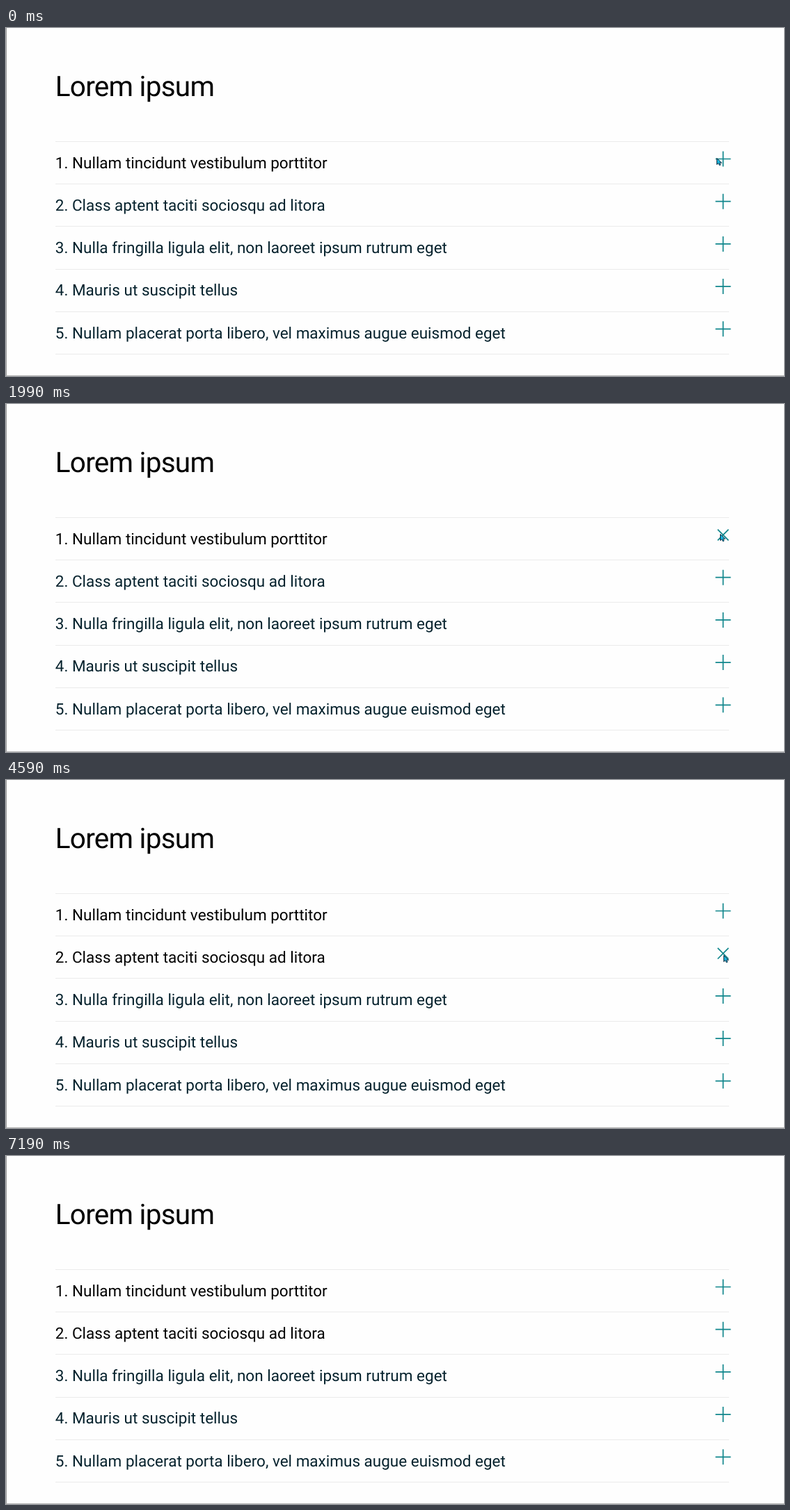
Write an HTML page with a canvas that moves like this. It is 1118 px wide and 501 px high and loops after 7.89 s.

```html
<!DOCTYPE html>
<html lang="la">
<head>
<meta charset="utf-8">
<title>Accordion</title>
<style>
  html, body { margin: 0; width: 100%; height: 100%; overflow: hidden; background: #fefefe; }
  canvas { display: block; }
</style>
</head>
<body>
<canvas id="stage" width="1118" height="501"></canvas>
<script>
const ctx = document.getElementById('stage').getContext('2d', { alpha: false });
const LOOP = 7890, LEFT = 70.8, PITCH = 61.2, PANEL = 54.5;
const TEAL = '#10808a', INK = '#06222d', BLACK = '#000';

const titles = [
  '1. Nullam tincidunt vestibulum porttitor',
  '2. Class aptent taciti sociosqu ad litora',
  '3. Nulla fringilla ligula elit, non laoreet ipsum rutrum eget',
  '4. Mauris ut suscipit tellus',
  '5. Nullam placerat porta libero, vel maximus augue euismod eget'
];
const panel = [
  'Cras vel nibh ac nisi dignissim molestie et sit amet dui. Quisque pulvinar vulputate mollis. ' +
  'Curabitur tempor risus turpis, ut condimentum arcu volutpat vitae. Curabitur in dolor',
  'eu justo viverra suscipit.'
];

const pointer = [
  [0, 1021, 187], [150, 1025, 187], [300, 1026, 187], [2580, 1033, 225], [2750, 1032, 238],
  [2880, 1031, 247], [3020, 1031, 252], [6730, 1040, 301], [6900, 1074, 440], [7050, 1092, 496],
  [7190, 1092, 520]
];
const clicks = [
  { row: 0, open: 800, opened: 950, close: 1990, turn: 2160, closed: 2310 },
  { row: 1, open: 3430, opened: 3560, close: 4590, turn: 4770, closed: 4930 }
];

const stepAt = (steps, t) => steps.filter(s => s[0] <= t).pop();

function text(str, y, size, color, spacing = 0) {
  ctx.font = `${size}px Roboto, sans-serif`;
  ctx.letterSpacing = spacing + 'px';
  ctx.textRendering = 'geometricPrecision';
  ctx.fillStyle = color;
  ctx.fillText(str, LEFT, y);
}

function rule(y) {
  ctx.fillStyle = '#ebebeb';
  ctx.fillRect(71, Math.round(y), 968, 1);
}

function plus(y, degrees) {
  ctx.save();
  ctx.translate(1030.5, y);
  ctx.rotate(degrees * Math.PI / 180);
  ctx.strokeStyle = '#10868c';
  ctx.lineWidth = 1.7;
  ctx.stroke(new Path2D('M-11 0H11M0-11V11'));
  ctx.restore();
}

const arrow = new Path2D('M.5 .5V9.6L2.7 7.7L4.3 10.8L5.9 10L4.5 7.1H7.5Z');
function drawPointer(x, y) {
  ctx.save();
  ctx.translate(x, y);
  ctx.fillStyle = '#19b4dc';
  ctx.strokeStyle = '#0b2c40';
  ctx.lineWidth = 1;
  ctx.fill(arrow);
  ctx.stroke(arrow);
  ctx.restore();
}

function angleOf(c, t) {
  if (!c || t < c.open || t >= c.closed) return 0;
  return t < c.opened || t >= c.turn ? 15 : 45;
}

function colorOf(c, row, t) {
  if (c && t >= c.open && t < c.close) return t < c.opened ? '#085058' : TEAL;
  return row === 0 || (c && t >= c.close) ? BLACK : INK;
}

function draw(t) {
  ctx.fillStyle = '#fefefe';
  ctx.fillRect(0, 0, 1118, 501);
  text('Lorem ipsum', 97.5, 40.5, BLACK, -0.75);
  rule(163);

  let shift = 0;
  titles.forEach((title, row) => {
    const y = row * PITCH + shift;
    const click = clicks.find(c => c.row === row);
    text(title, 201.8 + y, 22.5, colorOf(click, row, t));
    plus(188.5 + y, angleOf(click, t));
    if (click && t >= click.open && t < click.close) {
      panel.forEach((line, i) => text(line, 238 + y + i * 18.7, 12.49, '#505050'));
      shift = PANEL;
    }
    rule(163 + (row + 1) * PITCH + shift);
  });

  ctx.fillStyle = '#9a9a9a';
  ctx.fillRect(0, 0, 1, 501);
  ctx.fillStyle = '#b4b4b4';
  ctx.fillRect(0, 500, 1118, 1);

  const [, x, y] = stepAt(pointer, t);
  drawPointer(x, y);
}

const start = performance.now();
function frame() {
  draw((performance.now() - start) % LOOP);
  requestAnimationFrame(frame);
}
frame();
</script>
</body>
</html>
```
